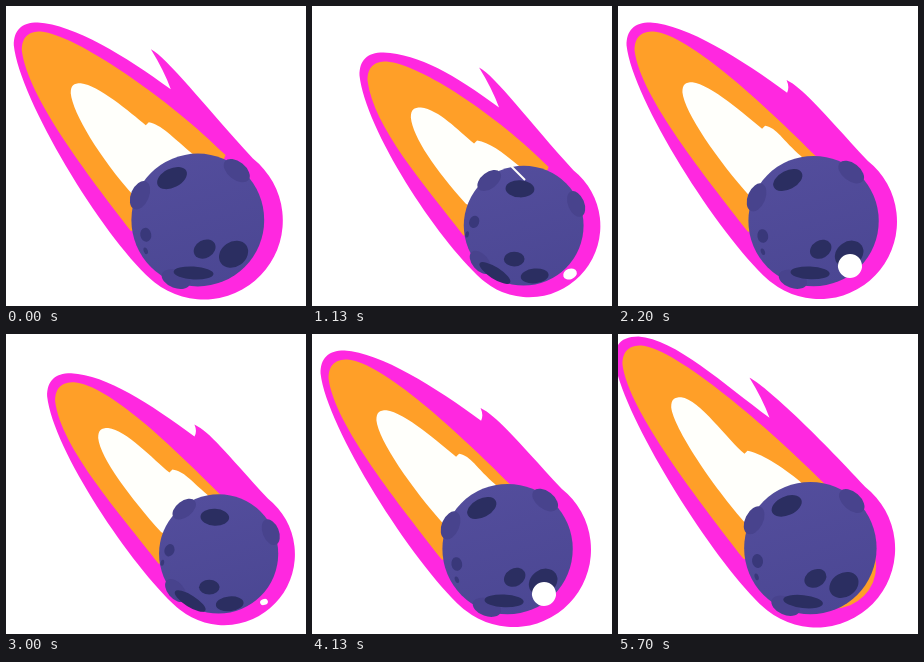
An HTML page with a canvas for the animation above (5730 ms loop, 300 by 300 pixels).

```html
<!DOCTYPE html>
<html>
<head>
<meta charset="utf-8">
<style>
html, body { margin: 0; width: 100%; height: 100%; overflow: hidden; background: #fff; }
canvas { display: block; width: 100vw; height: 100vh; }
</style>
</head>
<body>
<canvas id="stage" width="300" height="300"></canvas>
<script>
const ctx = document.getElementById('stage').getContext('2d');
const LOOP = 5730, CYCLE = 58, BEATS = 7, TAU = Math.PI * 2;
const DARK = '#2b2e61', FAINT = '#39387a', RIM = '#48438d';

// x, y, rx, ry, tilt in degrees, colour; around the moon's centre
const CRATERS = [
  [-26, -42, 16, 9.5, -27, DARK],
  [36, 34, 15.5, 12.5, -35, DARK],
  [7, 29, 11.5, 9, -30, DARK],
  [-4, 53, 20, 6.5, 3, DARK],
  [-52, 15, 5.5, 7, -10, FAINT],
  [-52, 31, 2, 3.5, -20, FAINT]
];
const RIMS = [-52, -157, 110]; // degrees around the moon's edge

const rad = deg => deg * TAU / 360;
const wave = x => Math.cos(x / CYCLE * TAU);
const frac = x => x - Math.floor(x);
const smooth = x => { const t = Math.min(1, Math.max(0, x)); return t * t * (3 - 2 * t); };
const at = (o, x, y) => [o[0] + x, o[1] + y];
const move = a => { ctx.beginPath(); ctx.moveTo(...a); };
const line = a => ctx.lineTo(...a);
const curve = (a, b, c) => ctx.bezierCurveTo(...a, ...b, ...c);
const fill = color => { ctx.fillStyle = color; ctx.fill(); };

function ellipse(x, y, rx, ry, deg, color) {
  ctx.beginPath();
  ctx.ellipse(x, y, rx, ry, rad(deg), 0, TAU);
  fill(color);
}

// A slow sway of the whole comet, with a quick flicker of the tail.
function pose(p) {
  const beat = (p + 3.4) * BEATS / CYCLE;
  const flicker = -Math.cos(beat * TAU);
  const lick = frac(beat - .192);           // one flame lick per beat
  const grown = smooth((lick - .18) / .04);
  const drift = -26 * lick ** 4;
  const r = 62.9 + 3.5 * wave(p), k = r / 66.5;
  const M = [202.5 - 10.7 * wave(p), 217 - 3 * wave(p)];
  const T = [20 - 20 * wave(p - 3) + 8 * flicker, 23 - 15 * wave(p - 3) + 9 * flicker];
  const N = at(M, -27 * k + drift, -131 * k);
  const S = at(N, -20 * grown, -12 - 28 * grown);
  const roll = .54 - .6 * wave(p - 4.5);
  return { M, T, N, S, r, k, grown, drift, roll };
}

// T: tail corner, N: notch, S: lick tip, M: moon centre
function drawFlame({ M, T, N, S, r, k, grown, drift }) {
  const m = (x, y) => at(M, x * k, y * k);
  const W = at(T, 57 * k, 61 * k), P = at(N, -22, 33);
  const C = m(6, .5), R = r * 1.19;
  const end = 3 + 25 * grown + drift, inner = -5 + .3 * (end - 28);

  move(at(T, 0, 23));
  curve(at(T, 0, 8), at(T, 7, 0), at(T, 24, 0));
  curve(at(T, 60, 2), at(N, -45, -33), N);
  ctx.quadraticCurveTo((N[0] + S[0]) / 2 + 3, (N[1] + S[1]) / 2 + 1, ...S);
  curve(at(S, 16, 8), m(6, -115), at(C, R * Math.cos(.9), -R * Math.sin(.9)));
  ctx.arc(...C, R, -.9, 2.3);
  curve(m(-97, 14), at(T, 6, 77), at(T, 0, 23));
  fill('#ff28e0');

  move(at(T, 8, 28));
  curve(at(T, 8, 14), at(T, 15, 9), at(T, 27, 9));
  curve(at(T, 62, 12), m(end - 56, -121), m(end, -65));
  line(M);
  line(m(-67, 11));
  curve(m(-110, -45), at(T, 14, 75), at(T, 8, 28));
  fill('#ff9f28');
  ellipse(M[0] - 1.7 * drift, M[1] - 1.3 * drift, 42, 42, 0, '#ff9f28');

  move(at(W, 0, 10));
  curve(at(W, 0, 2), at(W, 3, 0), at(W, 10, 0));
  curve(at(W, 28, 2), at(P, -19, -10), at(P, -3, 3));
  line(P);
  curve(at(P, 12, 2), m(inner - 20, -83), m(inner, -66));
  line(M);
  line(m(-64, -24));
  curve(m(-98, -62), at(W, 2, 30), at(W, 0, 10));
  fill('#fffffb');
}

function drawMoon({ M, k, roll }) {
  ctx.save();
  ctx.translate(...M);
  ctx.scale(k, k);
  const shade = ctx.createLinearGradient(-20, -66, 20, 66);
  shade.addColorStop(0, '#534d9c');
  shade.addColorStop(1, '#4b4793');
  const turn = rad(26 * roll);
  ellipse(0, 0, 66.5, 66.5, 0, shade);
  for (const deg of RIMS) {
    const a = rad(deg) + turn;
    ellipse(63 * Math.cos(a), 63 * Math.sin(a), 9, 15, deg + 26 * roll, RIM);
  }
  ctx.translate(-2 * roll, 7.5 * roll);
  ctx.rotate(turn);
  for (const [x, y, rx, ry, deg, color] of CRATERS) {
    const squash = 1 - .3 * roll * smooth(x / 20);
    ellipse(x, y, rx, ry * squash, deg, color);
  }
  ctx.restore();
}

// A white dot that swells to its size and shrinks again.
function spark(age, x, y, size, flat) {
  const s = Math.max(0, size - 1.5 * Math.abs(age));
  ellipse(x, y, s, s * flat, -20, '#fff');
}

function draw(ms) {
  let step = Math.floor((ms % LOOP + 5) * 3 / 100);
  if (step % 18 === 1 || step % 18 === 13) step--; // short holds
  const p = step % CYCLE, now = pose(p);

  ctx.fillStyle = '#fff';
  ctx.fillRect(0, 0, 300, 300);
  drawFlame(now);
  drawMoon(now);
  spark(p - 8, 232, 260, 12, 1);
  spark(p - 34, 258, 268, 7, .75);

  const glint = Math.max(0, 16 - 8 * Math.abs(p - 34));
  move([213 - glint, 174 - glint]);
  line([213, 174]);
  ctx.strokeStyle = '#fffffb';
  ctx.lineWidth = 2;
  if (glint) ctx.stroke();
}

function tick() {
  draw(performance.now());
  requestAnimationFrame(tick);
}
tick();
</script>
</body>
</html>
```
